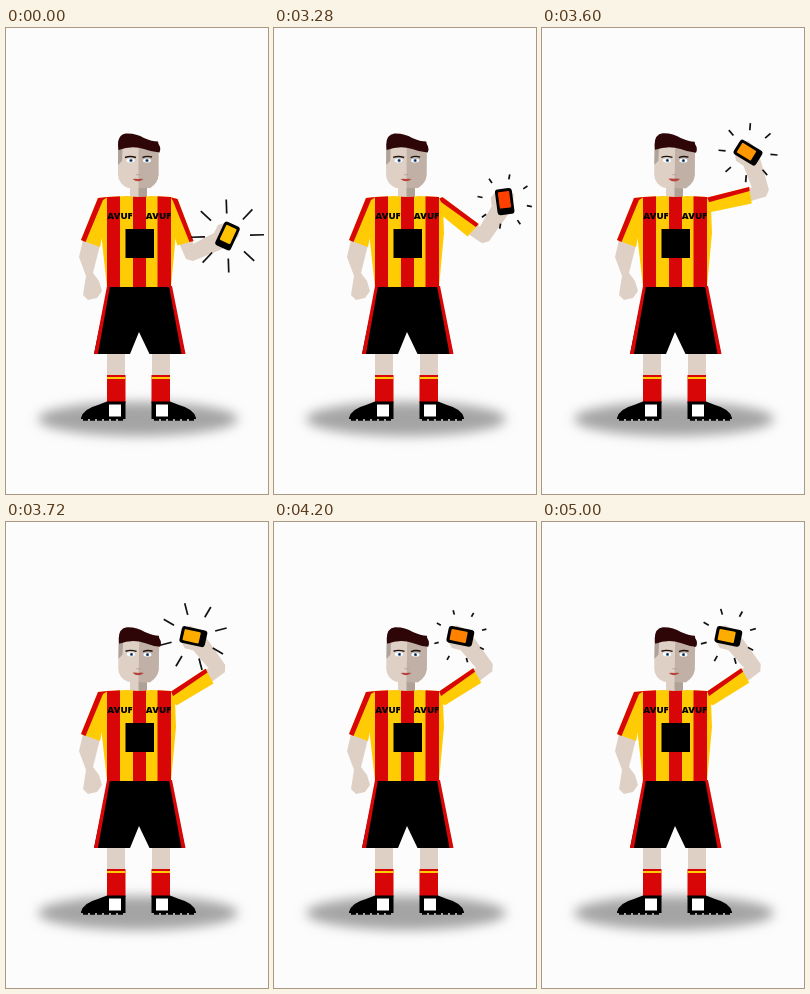
Write an HTML page that moves like this. It is 262 px wide and 466 px high and loops after 5.04 s.

```html
<!DOCTYPE html>
<html lang="en">
<head>
<meta charset="utf-8">
<title>Player with ringing phone</title>
<style>
  html, body { margin: 0; width: 100%; height: 100%; overflow: hidden; background: #fcfcfc; }
  svg { display: block; width: 262px; height: 466px; }
  text { font: 800 9.5px "Open Sans", "Noto Sans", sans-serif; text-anchor: middle; }
  .skin { fill: #dfd0c5; }
  .red { fill: #d80606; }
  .yellow { fill: #ffcb05; }
  .ray { stroke: #111; stroke-width: 1.7; }
</style>
</head>
<body>
<svg viewBox="0 0 262 466">
  <defs>
    <filter id="soft" x="-20%" y="-80%" width="140%" height="260%">
      <feGaussianBlur stdDeviation="6"/>
    </filter>
    <clipPath id="torso">
      <path d="M101 169L122 168Q133 170 145 168L165 169L169 179L170 205L165 259H101L95 205Z"/>
    </clipPath>
    <g id="foot">
      <rect class="skin" x="101" y="318" width="18" height="30"/>
      <rect class="red" x="101" y="347" width="18.5" height="28"/>
      <rect class="yellow" x="101" y="349" width="18.5" height="2"/>
      <path d="M75 390Q77 381 92 377L101 373.500H119.500V391H75Z"/>
      <path d="M77 391.500H119" stroke="#000" stroke-width="2.500" stroke-dasharray="5 2"/>
      <rect x="103" y="376.500" width="12" height="12" fill="#fff"/>
    </g>
  </defs>

  <ellipse cx="132" cy="391" rx="100" ry="17" fill="#a4a4a4" filter="url(#soft)"/>
  <use href="#foot"/>
  <use href="#foot" transform="translate(265) scale(-1 1)"/>

  <path d="M102 258H165L179 326H143.500L133 304L124 326H88Z"/>
  <path class="red" d="M101 258H104L92 326H88ZM163 258H166L179.500 326H175.500Z"/>

  <path class="skin" d="M77 212L73 229L80 248L77 267L82 272L91 270L96 263L93 253L87 245L90 233L94 217Z"/>
  <path class="yellow" d="M92 170L102 169L99 195L94 219L75 212Z"/>
  <path class="red" d="M92 170L102 169L97 172L79.500 214L75 212Z"/>

  <g id="arm">
    <path class="skin" d="M187 211L187 216L208 205L212 197L222 194L231 198L233 207L226 216L214 222L187 233L180 231L173 215Z"/>
    <path class="yellow" d="M158 177L165 169L171.500 171L187.500 213L171.500 217.500Z"/>
    <path class="red" d="M163 169L171.500 171L187.500 213L183.500 214L167 173Z"/>
    <g transform="translate(221.500 208)">
      <g transform="rotate(25)">
        <rect x="-8.500" y="-13" width="17" height="26" rx="3"/>
        <rect id="screen" x="-5.700" y="-10" width="11.400" height="16.500" rx="1"/>
      </g>
      <g id="rays" transform="rotate(-2)"></g>
    </g>
  </g>

  <path class="skin" d="M124 152H141V169Q133 172 124 169Z"/>
  <path d="M132.500 152H141V169L132.500 171Z" fill="#b0a196"/>
  <g clip-path="url(#torso)">
    <rect class="yellow" x="90" y="165" width="84" height="96"/>
    <path class="red" d="M101 165H114V260H101ZM127 165H140V260H127ZM151.500 165H165V260H151.500Z"/>
  </g>

  <g id="head">
    <path class="skin" d="M112 116H152.500V147Q152 155 144 160H122Q112.500 156 112 147Z"/>
    <path d="M132.500 116H152.500V147Q152 155 144 160H132.500Z" fill="#c0b0a5"/>
    <path d="M112 119H116.500L116 133L112 137Z" fill="#aea39a"/>
    <path d="M112.500 122Q110 107 120 105.500Q130 105 138 110Q146 113.500 152 113.500L152.500 116Q155.500 120 153.500 124.500Q146 124 138 121Q126 117 112.500 122Z" fill="#2e0608"/>
    <path d="M119 129.500Q124 127.500 130 129.500M136.500 129.500Q141 127.500 146 129" fill="none" stroke="#1c1512" stroke-width="1.400"/>
    <g fill="#fff"><ellipse cx="124.500" cy="132.500" rx="4" ry="2"/><ellipse cx="141" cy="132.500" rx="4" ry="2"/></g>
    <g fill="#3f78b5"><circle cx="125" cy="132.500" r="1.700"/><circle cx="141" cy="132.500" r="1.700"/></g>
    <g fill="#111"><circle cx="125" cy="132.500" r="0.800"/><circle cx="141" cy="132.500" r="0.800"/></g>
    <path d="M130 146.500Q132 147.500 134.500 146.500" fill="none" stroke="#ad9c91" stroke-width="0.800"/>
    <path id="mouth" d="M-5.500 -1Q-2 -1.600 0 -1Q2 -1.600 5.500 -1Q0 3.500 -5.500 -1Z" fill="#b8423c"/>
  </g>

  <text x="114" y="190.500">AVUF</text>
  <text x="152.500" y="190.500">AVUF</text>
  <rect x="119.500" y="201" width="28.500" height="29"/>
</svg>

<script>
const LOOP = 5040, STEP = 40, REST = 3040;
const $ = id => document.getElementById(id);
const clamp = v => Math.min(1, Math.max(0, v));
const mix = (a, b, k) => a + (b - a) * k;

const rays = Array.from({ length: 8 }, (_, i) => {
  const ray = document.createElementNS("http://www.w3.org/2000/svg", "line");
  ray.setAttribute("class", "ray");
  ray.setAttribute("transform", `rotate(${i * 45})`);
  ray.setAttribute("y1", -22.5);
  $("rays").append(ray);
  return ray;
});

// 1 at the start of each period, 0 halfway
const swing = (t, period) => Math.abs(1 - 2 * (t / period % 1));

function draw(ms) {
  const t = Math.max(REST, Math.floor(ms / STEP) * STEP) - REST;

  const lift = clamp((t - 36) / 650);
  $("arm").setAttribute("transform", `rotate(${-103.5 * lift} 167 175)`);
  $("head").setAttribute("transform", `rotate(${lift} 133 160)`);

  const smile = clamp(1 - Math.abs(t - 540) / 240);
  $("mouth").setAttribute("transform",
    `translate(132 152) scale(${1 + 0.1 * smile} ${1 + 0.2 * smile})`);

  const heat = 1 - swing(t, 640);
  $("screen").setAttribute("fill", `rgb(255, ${Math.round(mix(194, 20, heat))}, 0)`);

  const length = 4 + 10 * swing(t, 720) ** 2;
  rays.forEach(ray => ray.setAttribute("y2", -22.5 - length));
}

const start = performance.now();
function tick() {
  draw((performance.now() - start) % LOOP);
  requestAnimationFrame(tick);
}
tick();
</script>
</body>
</html>
```
